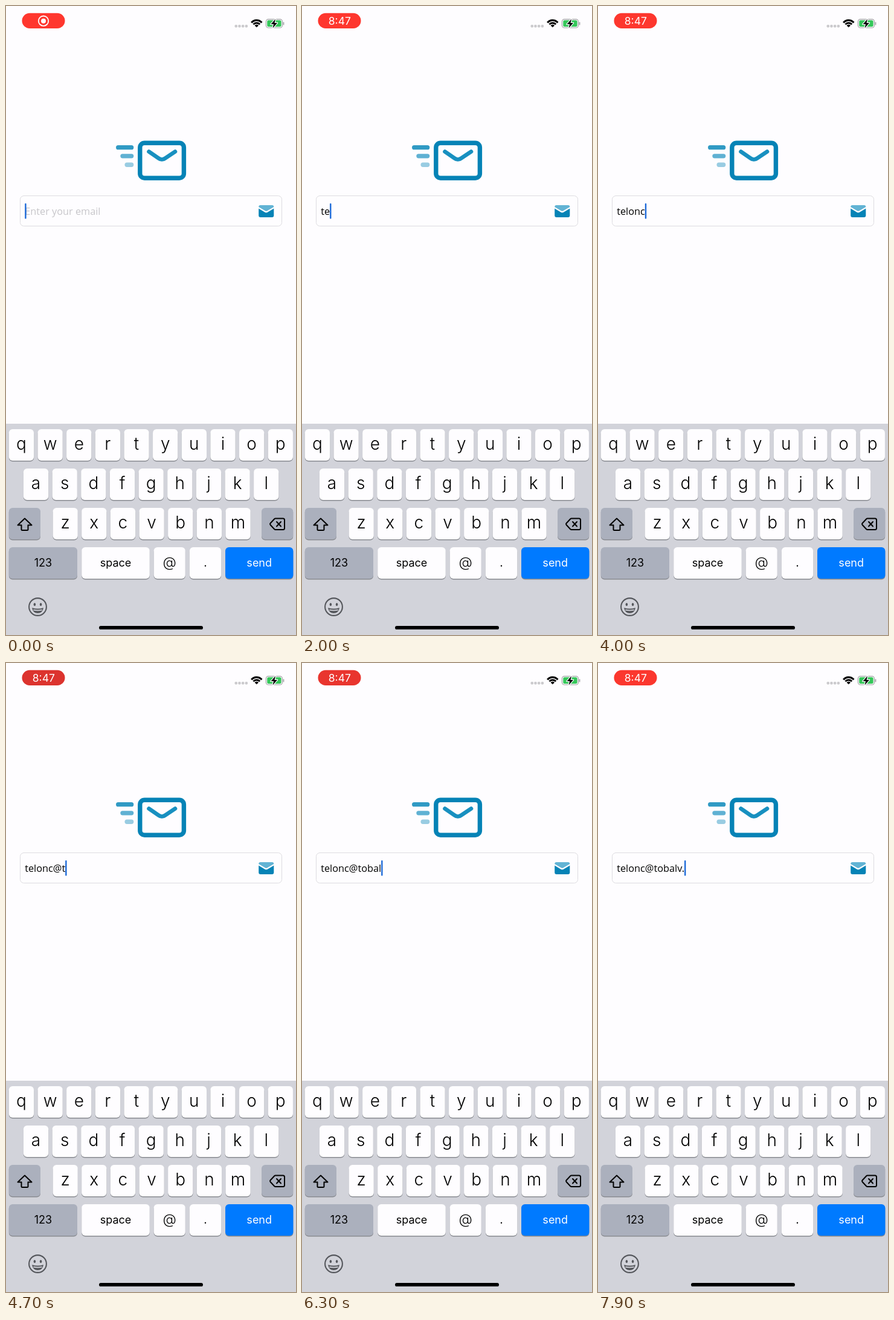
Animation, 480 px wide and 1039 px high, one loop 8000 ms. Source, as an HTML page with a canvas:

```html
<!DOCTYPE html>
<html lang="en">
<head>
<meta charset="utf-8">
<title>Email sign-in</title>
<style>
  html, body { margin: 0; width: 100%; height: 100%; overflow: hidden; background: #fefdff; }
  canvas { display: block; width: 480px; height: 1039px; }
</style>
</head>
<body>
<canvas id="stage"></canvas>
<script>
const W = 480, H = 1039, LOOP = 8000, STEP = 100;
const UI = 'Inter, Roboto, sans-serif';
const FIELD_FONT = '16.3px "Open Sans", "Noto Sans", sans-serif';
const PAGE = '#fefdff', BLUE = '#0583b6', INK = '#000', BOARD = '#d2d3da', GRAY = '#abb0bd';

const EMAIL = 'telonc@tobalv.';
const TYPED_AT = [1350, 1800, 2400, 2850, 3250, 3700, 4150, 4500, 4900, 5150, 5440, 6000, 6900, 7700];

const canvas = document.getElementById('stage');
const ctx = canvas.getContext('2d');
const ratio = window.devicePixelRatio || 1;
canvas.width = W * ratio;
canvas.height = H * ratio;
ctx.scale(ratio, ratio);

const clamp = v => Math.max(0, Math.min(1, v));

function box(x, y, w, h, r, fill) {
  ctx.beginPath();
  ctx.roundRect(x, y, w, h, r);
  ctx.fillStyle = fill;
  ctx.fill();
}

function disc(x, y, r, fill) {
  ctx.beginPath();
  ctx.arc(x, y, r, 0, Math.PI * 2);
  ctx.fillStyle = fill;
  ctx.fill();
}

function line(path, color, width) {
  ctx.strokeStyle = color;
  ctx.lineWidth = width;
  ctx.lineCap = ctx.lineJoin = 'round';
  ctx.stroke(new Path2D(path));
}

function shape(path, color) {
  ctx.fillStyle = color;
  ctx.fill(new Path2D(path));
}

function label(text, x, y, font, color, align = 'center') {
  ctx.font = font;
  ctx.fillStyle = color;
  ctx.textAlign = align;
  ctx.fillText(text, x, y);
}

// Keyboard layout
const keys = [];
['qwertyuiop', 'asdfghjkl', 'zxcvbnm'].forEach((row, i) => {
  const left = [4.8, 28.9, 77.5][i];
  [...row].forEach((char, j) => keys.push({
    char, x: left + j * 47.65, y: 699 + i * 65, w: 41.3,
    font: `300 28px ${UI}`, base: 34
  }));
});
keys.push(
  { char: '@', x: 244.6, y: 894, w: 52.2, font: `300 23px ${UI}`, base: 33 },
  { char: '.', x: 303.9, y: 894, w: 52.2, font: `400 19px ${UI}`, base: 31.5 }
);

function keyCap(x, y, w, fill) {
  box(x, y + 1.4, w, 52, 6, '#898b91');
  box(x, y, w, 52, 6, fill);
}

function wideKey(text, x, w, fill, color) {
  keyCap(x, 894, w, fill);
  label(text, x + w / 2, 925.5, `400 18px ${UI}`, color);
}

function popup({ char, x, y, w }) {
  const l = x - 15, r = x + w + 15, top = y - 72, k = x + w, bottom = y + 52;
  const outline = `M${l + 12} ${top}H${r - 12}Q${r} ${top} ${r} ${top + 12}V${y - 23}
    C${r} ${y - 10} ${k} ${y - 10} ${k} ${y + 7}V${bottom - 6}Q${k} ${bottom} ${k - 6} ${bottom}
    H${x + 6}Q${x} ${bottom} ${x} ${bottom - 6}V${y + 7}
    C${x} ${y - 10} ${l} ${y - 10} ${l} ${y - 23}V${top + 12}Q${l} ${top} ${l + 12} ${top}Z`;
  ctx.save();
  ctx.shadowColor = 'rgba(0,0,0,.38)';
  ctx.shadowBlur = 8 * ratio;
  ctx.shadowOffsetY = ratio;
  shape(outline, PAGE);
  ctx.restore();
  label(char, x + w / 2, y - 28, `300 38px ${UI}`, INK);
}

function face() {
  ctx.beginPath();
  ctx.arc(52.5, 992.5, 14.4, 0, Math.PI * 2);
  ctx.strokeStyle = '#55575c';
  ctx.lineWidth = 2.1;
  ctx.stroke();
  for (const x of [47.4, 57.6]) {
    ctx.beginPath();
    ctx.ellipse(x, 988.5, 1.8, 2.6, 0, 0, Math.PI * 2);
    ctx.fillStyle = '#55575c';
    ctx.fill();
  }
  shape('M43 994Q52.5 997 62 994Q60.5 1003 52.5 1003Q44.500 1003 43 994Z', '#55575c');
  line('M46 997.600Q52.500 999.200 59 997.600', BOARD, 1.8);
}

function keyboard(t) {
  ctx.fillStyle = BOARD;
  ctx.fillRect(0, 690, W, H - 690);
  for (const key of keys) {
    keyCap(key.x, key.y, key.w, PAGE);
    label(key.char, key.x + key.w / 2, key.y + key.base, key.font, INK);
  }
  keyCap(4.8, 829, 52.2, GRAY);
  keyCap(423, 829, 52.2, GRAY);
  line('M31 846.500L42.500 857.500H36.500V864.500Q36.500 866 35 866H27Q25.500 866 25.500 864.500V857.500H19.500Z', INK, 2);
  line('M446 846.500H458.500Q461 846.500 461 849V862.500Q461 865 458.500 865H446Q445 865 444 864L437.500 857Q436.500 855.700 437.500 854.500L444 847.500Q445 846.500 446 846.500Z', INK, 2);
  line('M448 852L455 859.500M455 852L448 859.500', INK, 2);
  wideKey('123', 4.8, 113.2, GRAY, INK);
  wideKey('space', 125.2, 112.6, PAGE, INK);
  wideKey('send', 363, 112.4, '#007aff', '#fff');
  face();
  box(154, 1024, 172, 5.8, 2.9, INK);

  const pressed = TYPED_AT.findIndex(at => t >= at - 70 && t < at + 110);
  if (pressed >= 0) popup(keys.find(key => key.char === EMAIL[pressed]));
}

function recordingPill(t) {
  const glow = (1 + Math.cos(t / 1920 * Math.PI * 2)) / 2;
  box(26.5, 11.800, 71, 25.2, 12.6, `rgb(${219 + 36 * glow},${51 + 4 * glow},46)`);
  const clock = clamp((t - 700) / 400);
  ctx.globalAlpha = 1 - clock;
  ctx.beginPath();
  ctx.arc(62, 24.7, 8.2, 0, Math.PI * 2);
  ctx.strokeStyle = '#fff';
  ctx.lineWidth = 1.8;
  ctx.stroke();
  disc(62, 24.7, 4, '#fff');
  ctx.globalAlpha = clock;
  label('8:47', 62.3, 31, `400 17.5px ${UI}`, '#fff');
  ctx.globalAlpha = 1;
}

function statusIcons() {
  for (let i = 0; i < 4; i++) box(378.5 + i * 5.7, 31, 4.5, 4.5, 1.7, '#cbcacd');

  ctx.strokeStyle = INK;
  ctx.lineCap = 'butt';
  for (const [radius, width] of [[11.6, 3], [7.2, 2.8], [2.2, 4.4]]) {
    ctx.beginPath();
    ctx.arc(414.8, 35.2, radius, -Math.PI * .765, -Math.PI * .235);
    ctx.lineWidth = width;
    ctx.stroke();
  }

  ctx.beginPath();
  ctx.roundRect(430.4, 21.8, 27, 14.2, 4);
  ctx.strokeStyle = '#a2a2a5';
  ctx.lineWidth = 1.2;
  ctx.stroke();
  box(432.2, 23.6, 23.4, 10.6, 2.5, '#34c759');
  box(458.6, 26.5, 1.7, 5, 1, '#a2a2a5');
  const bolt = 'M446 21.500L438.500 30H443L441.500 36.500L449 28H444.500Z';
  line(bolt, PAGE, 2.4);
  shape(bolt, INK);
}

function mailArt() {
  [[182, 230, '#309ac4'], [189.3, 244.2, '#5fb1d3'], [196.5, 258.6, '#99cce2']]
    .forEach(([x, y, color]) => box(x, y, 211.3 - x, 7.3, 3.65, color));
  ctx.beginPath();
  ctx.roundRect(221.8, 226.2, 72.6, 58, 7.5);
  ctx.strokeStyle = BLUE;
  ctx.lineWidth = 7.4;
  ctx.stroke();
  line('M236.500 240.500L252.500 251.500Q258 255.500 263.500 251.500L280 240.500', '#1890c0', 6.6);
}

function emailField(t) {
  ctx.beginPath();
  ctx.roundRect(23.5, 313.5, 433, 50, 6);
  ctx.strokeStyle = '#dddce0';
  ctx.lineWidth = 1;
  ctx.stroke();

  shape('M421 329H440.500Q443.300 329 443.300 332L432 338.500Q430.700 339.200 429.400 338.500L418.200 332Q418.200 329 421 329Z', '#62b3d4');
  shape('M418.200 334.500L429 340.900Q430.700 341.800 432.400 340.900L443.300 334.500V346Q443.300 349 440.300 349H421.200Q418.200 349 418.200 346Z', BLUE);

  const count = TYPED_AT.filter(at => t >= at).length;
  const text = EMAIL.slice(0, count);
  label(text || 'Enter your email', 31.2, 345, FIELD_FONT, text ? INK : '#c7c6ca', 'left');

  // The caret stays solid after each key, then blinks once a second
  const phase = (t - (count ? TYPED_AT[count - 1] : 0)) % 1000;
  ctx.globalAlpha = 1 - clamp((phase - 450) / 100) + clamp((phase - 750) / 100);
  const width = text ? ctx.measureText(text).width : 0;
  box(31.2 + width, 326, 2.4, 25.5, 1, '#1c69d8');
  ctx.globalAlpha = 1;
}

function draw(now) {
  const t = Math.floor((now % LOOP) / STEP) * STEP;
  ctx.fillStyle = PAGE;
  ctx.fillRect(0, 0, W, H);
  recordingPill(t);
  statusIcons();
  mailArt();
  emailField(t);
  keyboard(t);
}

let start;
function tick(now) {
  start ??= now;
  draw(now - start);
  requestAnimationFrame(tick);
}
draw(0);
requestAnimationFrame(tick);
</script>
</body>
</html>
```
